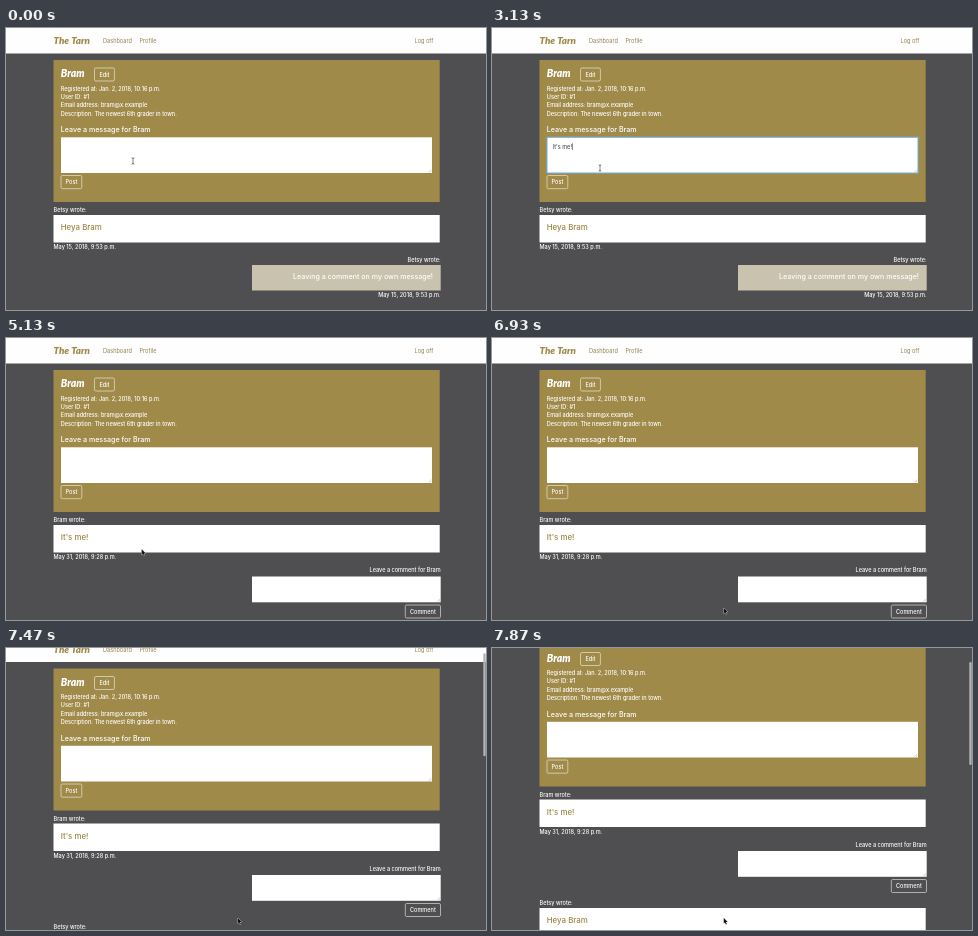
Animation, 480 px wide and 282 px high, one loop 8 s. Source, as an HTML page with a canvas:

```html
<!DOCTYPE html>
<html lang="en">
<head>
<meta charset="utf-8">
<title>Message board</title>
<style>
  html, body { margin: 0; width: 100%; height: 100%; overflow: hidden; background: #4f4e50; }
  canvas { display: block; width: 480px; height: 282px; }
</style>
</head>
<body>
<canvas id="stage"></canvas>
<script>
const W = 480, H = 282, LOOP = 8000, TICK = 1000 / 15;
const GOLD = '#a08a4a', DARK = '#4f4e50', WHITE = '#fff', INK = '#343a40';
const SANS = 'Inter, "Open Sans", sans-serif';
const LOGO = 'Lato, Inter, sans-serif';
const USER = 'Bram', FRIEND = 'Betsy';

const canvas = document.getElementById('stage');
const ctx = canvas.getContext('2d');
const dpr = window.devicePixelRatio || 1;
canvas.width = W * dpr;
canvas.height = H * dpr;

// Pointer moves: start tick, end tick, destination
const START = [127, 133];
const MOVES = [
  [0, 3, 108, 140],
  [47, 54, 65, 152.5],
  [72, 77, 135.7, 211.3],
  [86, 92, 211, 265],
  [100, 104, 231.8, 270]
];
// Tick and number of characters typed so far
const TYPED = "It's me!";
const KEYS = [[26, 1], [29, 2], [31, 4], [32, 5], [34, 6], [35, 7], [41, 8]];
// Tick and page offset
const SCROLL = [[108, 0], [109, 3], [112, 11.5], [115, 17.5], [118, 35.5]];

const FOCUS = 6, BLUR = 55, RELOAD = 59, UNHOVER = 73;

function text(str, x, y, o = {}) {
  const { size = 5.55, weight = 500, color = WHITE, align = 'left', family = SANS, style = '' } = o;
  ctx.font = `${style} ${weight} ${size}px ${family}`;
  ctx.fillStyle = color;
  ctx.textAlign = align;
  ctx.fillText(str, x, y);
}

function rect(x, y, x2, y2, color) {
  ctx.fillStyle = color;
  ctx.fillRect(x, y, x2 - x, y2 - y);
}

function outline(x, y, x2, y2, r, color, width) {
  ctx.beginPath();
  ctx.roundRect(x, y, x2 - x, y2 - y, r);
  ctx.strokeStyle = color;
  ctx.lineWidth = width;
  ctx.stroke();
}

function button(label, x, y, x2, y2, hover) {
  outline(x, y, x2, y2, 1.4, '#f4f1e8', 0.6);
  if (hover) {
    ctx.fillStyle = '#f8f9fa';
    ctx.fill();
  }
  text(label, (x + x2) / 2, (y + y2) / 2 + 2, { align: 'center', color: hover ? INK : WHITE });
}

function textarea(x, y, x2, y2, focused) {
  rect(x, y, x2, y2, WHITE);
  if (focused) {
    outline(x - 0.3, y - 0.3, x2 + 0.3, y2 + 0.3, 0.6, 'rgba(110,165,200,.45)', 1.6);
    outline(x, y, x2, y2, 0.5, '#78aed6', 0.7);
  }
  ctx.strokeStyle = '#999';
  ctx.lineWidth = 0.4;
  ctx.beginPath();
  for (const d of [2, 3.6]) {
    ctx.moveTo(x2 - d, y2 - 0.6);
    ctx.lineTo(x2 - 0.6, y2 - d);
  }
  ctx.stroke();
}

function post(author, message, date, y) {
  text(author + ' wrote:', 47.5, y + 10);
  rect(47.5, y + 13, 433.7, y + 40.5, WHITE);
  text(message, 54.7, y + 28.4, { size: 7.9, color: '#9c8544' });
  text(date, 47.5, y + 47);
}

function typedAt(k) {
  let n = 0;
  for (const [at, count] of KEYS) if (k >= at) n = count;
  return TYPED.slice(0, n);
}

function caretOn(k) {
  return (k >= FOCUS && k < 13) || (k >= 21 && k < 49);
}

function scrollAt(k) {
  let [pk, py] = SCROLL[0];
  for (const [sk, sy] of SCROLL) {
    if (k <= sk) return k <= pk ? py : py + (sy - py) * (k - pk) / (sk - pk);
    [pk, py] = [sk, sy];
  }
  return py;
}

function pointerAt(k) {
  let [x, y] = START;
  for (const [a, b, tx, ty] of MOVES) {
    const p = Math.min(1, Math.max(0, (k - a) / (b - a)));
    const e = p * p * (3 - 2 * p);
    x += (tx - x) * e;
    y += (ty - y) * e;
  }
  return [x, y];
}

function nav() {
  rect(0, 0, W, 25.5, '#fefefe');
  text('The Tarn', 47.5, 16, { size: 9.8, weight: 900, style: 'italic', family: LOGO, color: GOLD });
  const link = { color: '#96814a', weight: 400, size: 5.6 };
  text('Dashboard', 97, 15, link);
  text('Profile', 133.5, 15, link);
  text('Log off', 408.5, 15, link);
}

function profile(k, hover) {
  rect(47.5, 32, 433.7, 174, GOLD);
  text(USER, 54.8, 49, { size: 10.4, weight: 900, style: 'italic', family: LOGO });
  button('Edit', 88.5, 40, 108.4, 53);
  [
    'Registered at: Jan. 2, 2018, 10:16 p.m.',
    'User ID: #1',
    'Email address: bram@x.example',
    'Description: The newest 6th grader in town.'
  ].forEach((line, i) => text(line, 54.8, 62.5 + i * 8.48));
  text('Leave a message for ' + USER, 54.8, 104.3, { size: 7.1 });

  textarea(55, 109.3, 426, 145, k >= FOCUS && k < BLUR);
  if (k < RELOAD) {
    const typed = typedAt(k);
    text(typed, 60.6, 120.7, { color: INK, weight: 400, size: 5.6 });
    if (caretOn(k)) {
      const cx = 60.8 + ctx.measureText(typed).width;
      rect(cx, 115.3, cx + 0.5, 122, '#222');
    }
  }
  button('Post', 55, 147.5, 75.8, 160.7, hover);
}

function feed(k) {
  const right = { align: 'right' };
  const oldDate = 'May 15, 2018, 9:53 p.m.';
  if (k < RELOAD) {
    post(FRIEND, 'Heya ' + USER, oldDate, 174);
    text(FRIEND + ' wrote:', 434.7, 234.2, right);
    rect(246, 237, 434.7, 262.5, '#c9c2ae');
    text('Leaving a comment on my own message!', 427, 251, { size: 7.1, align: 'right' });
    text(oldDate, 434.7, 269.2, right);
  } else {
    post(USER, TYPED, 'May 31, 2018, 9:28 p.m.', 174);
    text('Leave a comment for ' + USER, 434.7, 234.2, right);
    textarea(246, 238.5, 434.7, 264.3);
    button('Comment', 399.3, 267, 434.5, 280);
    post(FRIEND, 'Heya ' + USER, oldDate, 282.5);
  }
}

function shape(points, fill, stroke) {
  ctx.beginPath();
  points.forEach(([x, y]) => ctx.lineTo(x, y));
  ctx.closePath();
  ctx.lineWidth = 0.7;
  ctx.strokeStyle = stroke;
  ctx.stroke();
  ctx.fillStyle = fill;
  ctx.fill();
}

function pointer(x, y, kind) {
  ctx.save();
  ctx.translate(x, y);
  if (kind === 'beam') {
    ctx.strokeStyle = '#333';
    ctx.lineWidth = 0.6;
    ctx.beginPath();
    for (const s of [-1, 1]) {
      ctx.moveTo(-1.4, s * 3.2);
      ctx.quadraticCurveTo(0, s * 3.2, 0, s * 2.2);
      ctx.quadraticCurveTo(0, s * 3.2, 1.4, s * 3.2);
    }
    ctx.moveTo(0, -2.4);
    ctx.lineTo(0, 2.4);
    ctx.stroke();
  } else if (kind === 'hand') {
    shape([[-0.6, 0], [0.4, 0], [0.6, 2.6], [3, 3.2], [3.3, 5], [2.4, 7.4],
      [-0.8, 7.4], [-2.8, 4.6], [-2.2, 4], [-0.7, 5]], WHITE, '#111');
  } else {
    shape([[0, 0], [0, 5.4], [1.2, 4.3], [2.1, 6.4], [3, 6], [2.1, 4], [3.8, 3.9]], '#111', '#ddd');
  }
  ctx.restore();
}

function draw(t) {
  const k = Math.floor((t + 5) / TICK);
  const offset = scrollAt(k);
  const [x, y] = pointerAt(k);
  const overPost = y > 147.5 && k < UNHOVER;

  ctx.setTransform(dpr, 0, 0, dpr, 0, 0);
  rect(0, 0, W, H, DARK);
  ctx.save();
  ctx.translate(0, -offset);
  nav();
  profile(k, overPost);
  feed(k);
  ctx.restore();

  if (offset > 0) {
    const top = 1 + offset * 0.366;
    ctx.beginPath();
    ctx.roundRect(477.3, top, 2.4, 103, 1.2);
    ctx.fillStyle = '#b3b2b4';
    ctx.fill();
  }
  pointer(x, y, overPost ? 'hand' : y < 147.5 ? 'beam' : 'arrow');
}

const begin = performance.now();
function loop() {
  draw((performance.now() - begin) % LOOP);
  requestAnimationFrame(loop);
}
loop();
</script>
</body>
</html>
```
